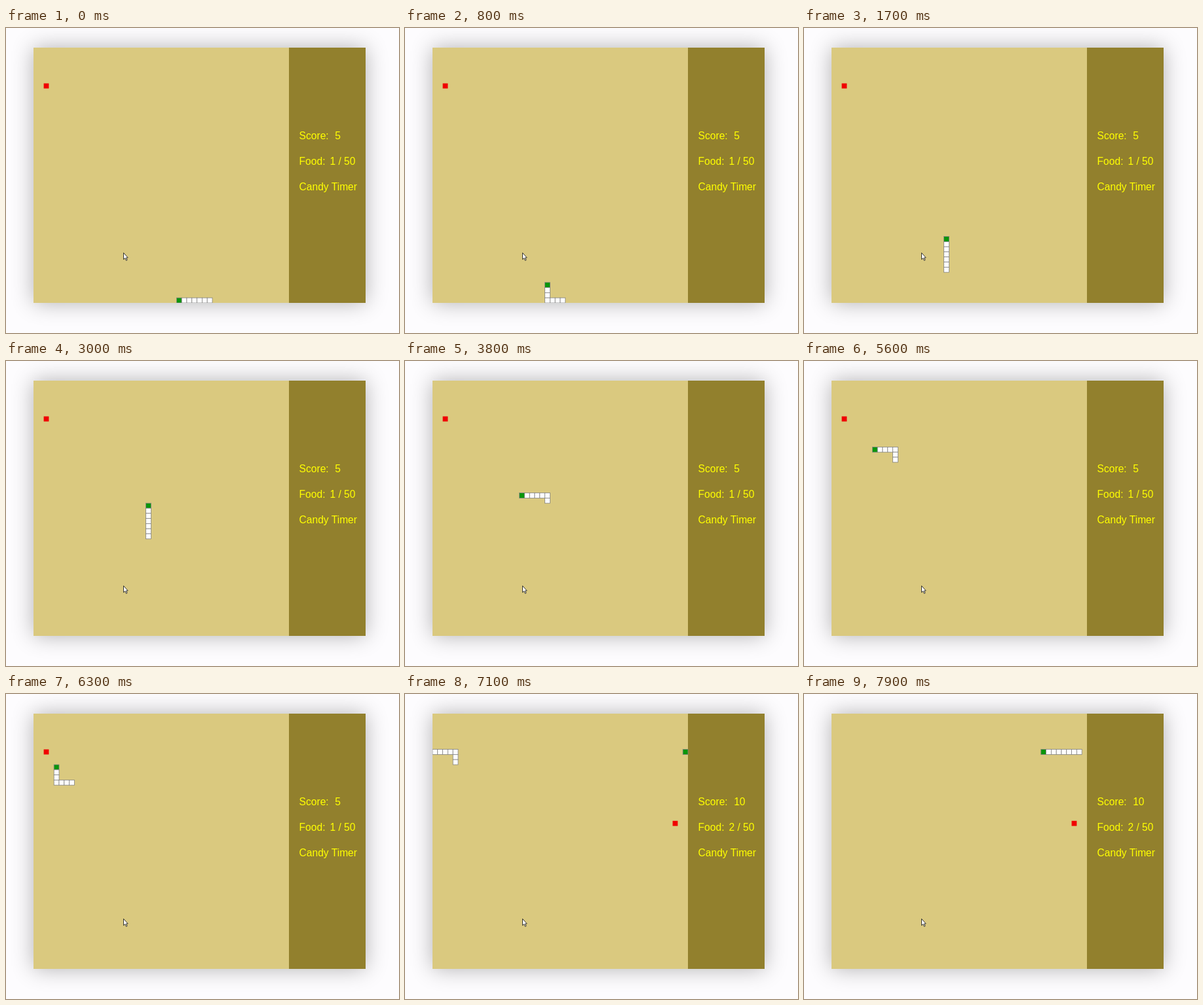
Write an HTML page that moves like this. It is 600x466 px and loops after 8 s.

```html
<!DOCTYPE html>
<html lang="en">
<head>
<meta charset="utf-8">
<title>Snake</title>
<style>
  html, body { margin: 0; width: 100%; height: 100%; overflow: hidden; background: #fdfcfe; }
  #game {
    position: absolute; left: 42px; top: 30px; width: 507px; height: 390px;
    box-shadow: 0 0 31px rgba(0, 0, 0, .3);
  }
  #game svg { display: block; width: 100%; height: 100%; }
  text { font: 20px "Liberation Sans", Arial, sans-serif; fill: #ff0; }
  #snake rect { fill: #fff; stroke: #808080; }
  #snake rect:first-child { fill: #0a960a; }
  #cursor { position: absolute; left: 178px; top: 342px; }
</style>
</head>
<body>
<div id="game">
  <svg viewBox="0 0 650 500">
    <rect width="500" height="500" fill="#dac97f"/>
    <rect x="500" width="150" height="500" fill="#92802d"/>
    <rect id="food" width="10" height="10" fill="#f00000"/>
    <g id="snake"></g>
    <text x="520" y="180">Score:</text>
    <text x="590" y="180" id="score">5</text>
    <text x="520" y="230">Food:</text>
    <text x="580" y="230" id="eaten">1 / 50</text>
    <text x="520" y="280">Candy Timer</text>
  </svg>
</div>
<svg id="cursor" width="10" height="16" viewBox="0 0 10 16">
  <path d="M1.5 1.5V11.6L3.8 9.5L5.4 13.2L7 12.5L5.4 9H8.2Z" fill="#fff" stroke="#222" stroke-width=".9"/>
</svg>
<script>
  const LOOP = 8000, TICK = 100, GRID = 50, CELL = 10, EAT_STEP = 68;
  const legs = [['L', 12], ['U', 27], ['L', 10], ['U', 9], ['L', 8], ['U', 6], ['L', 13]];
  const byId = id => document.getElementById(id);
  const food = byId('food'), snake = byId('snake'), score = byId('score'), eaten = byId('eaten');

  // Every cell the head visits, starting from the tail's first cell
  const path = [[34, 49]];
  for (const [dir, count] of legs) {
    for (let i = 0; i < count; i++) {
      const [x, y] = path[path.length - 1];
      path.push(dir === 'L' ? [(x + GRID - 1) % GRID, y] : [x, y - 1]);
    }
  }

  const cells = Array.from({ length: 8 }, () => {
    const cell = document.createElementNS('http://www.w3.org/2000/svg', 'rect');
    cell.setAttribute('width', CELL);
    cell.setAttribute('height', CELL);
    return snake.appendChild(cell);
  });

  function place(el, [x, y]) {
    el.setAttribute('x', x * CELL);
    el.setAttribute('y', y * CELL);
  }

  // The game clock runs one step ahead of the ticks in two stretches
  function stepAt(tick) {
    const ahead = (tick >= 8 && tick < 33) || (tick >= 44 && tick < 52);
    return tick + (ahead ? 1 : 0);
  }

  let shown = -1;
  function draw() {
    const step = stepAt(Math.floor(performance.now() % LOOP / TICK));
    if (step !== shown) {
      shown = step;
      const fed = step >= EAT_STEP;
      const length = fed ? 8 : 7;
      cells.forEach((cell, i) => {
        cell.style.display = i < length ? '' : 'none';
        if (i < length) place(cell, path[step + 6 - i]);
      });
      place(food, fed ? [47, 21] : [2, 7]);
      score.textContent = fed ? '10' : '5';
      eaten.textContent = fed ? '2 / 50' : '1 / 50';
    }
    requestAnimationFrame(draw);
  }
  draw();
</script>
</body>
</html>
```
